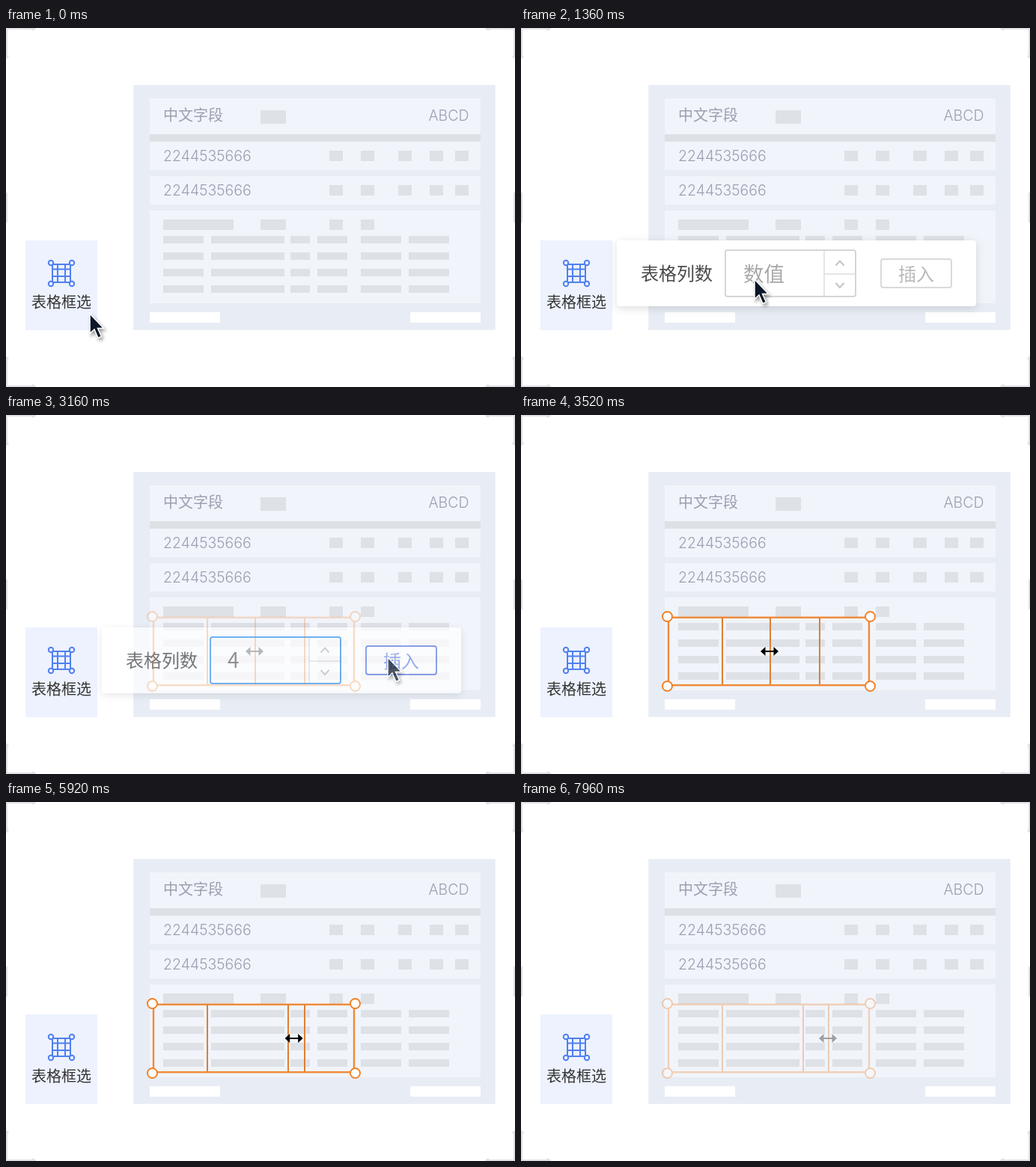
Recreate the animation shown at these times as an HTML page. Size 680 px wide and 480 px high, loop 8 s.

```html
<!DOCTYPE html>
<html lang="zh">
<head>
<meta charset="utf-8">
<title>表格框选</title>
<style>
  html, body { margin: 0; width: 100%; height: 100%; overflow: hidden; background: #fff; }
  svg { display: block; width: 680px; height: 480px; }
  text { font-family: "Noto Sans CJK SC", "Noto Sans CJK", sans-serif; }
  .thin { font-weight: 300; font-size: 20px; fill: #9a9fb0; }
  .latin { font-family: Inter, "Liberation Sans", sans-serif; font-size: 19.5px; }
  .line { fill: none; stroke-width: 2; }
  .popup { fill: #fff; filter: drop-shadow(0 3px 6px rgba(0, 0, 0, .13)); }
  .pointer { fill: #0d1729; stroke: #fff; stroke-width: 1.5; filter: drop-shadow(2px 3px 2px rgba(0, 0, 0, .4)); }
</style>
</head>
<body>
<svg viewBox="0 0 680 480">
  <defs>
    <path id="corner" d="M0 0H40V1L36 4L34 2H2V36L4 38L1 41H0Z" fill="#e1e2e7"/>
  </defs>
  <use href="#corner"/>
  <use href="#corner" transform="translate(680) scale(-1 1)"/>
  <use href="#corner" transform="translate(0 480) scale(1 -1)"/>
  <use href="#corner" transform="translate(680 480) scale(-1)"/>
  <path d="M0 220h2v40h-2zM678 220h2v40h-2z" fill="#e1e2e7"/>

  <rect x="170" y="76" width="484" height="328" fill="#e8ecf4"/>
  <rect x="170.5" y="76.5" width="483" height="327" fill="none" stroke="#edf1f7"/>
  <path d="M192 94h442v48h-442zM192 152h442v38h-442zM192 198h442v38h-442zM192 244h442v124h-442z" fill="#f1f4fa"/>
  <path d="M192 380h94v14h-94zM540 380h94v14h-94z" fill="#fff"/>
  <path d="M192 142h442v10h-442z" fill="#dde0e5"/>
  <g id="blocks" fill="#dee1e6"></g>
  <text class="thin" x="210" y="123.5">中文字段</text>
  <text class="thin latin" x="618.5" y="123.5" text-anchor="end">ABCD</text>
  <text class="thin latin" x="210" y="177.5">2244535666</text>
  <text class="thin latin" x="210" y="223.5">2244535666</text>

  <rect x="26" y="284" width="96" height="120" fill="#edf2fe"/>
  <g class="line" stroke="#4f80f0">
    <path d="M62 317V339M86 317V339M63 316H85M63 340H85M69 316V340M79 316V340M62 322.500H86M62 332H86"/>
    <g id="knobs" fill="#edf2fe"></g>
  </g>
  <text x="34" y="373.5" font-size="20" fill="#333">表格框选</text>

  <g id="popup">
    <rect class="popup" x="128" y="284" width="480" height="88" rx="4"/>
    <text x="160" y="336.500" font-size="24" fill="#4a4a4a">表格列数</text>
    <path class="line" d="M405 297V359M405 329H447" stroke="#dedede" style="stroke-width:1.5"/>
    <path class="line" d="M420.500 317.500L426 311.500L431.500 317.500M420.500 341L426 347L431.500 341" stroke="#c4c4c4"/>
    <g id="empty">
      <rect class="line" x="273" y="297" width="174" height="62" rx="3" stroke="#d6d6d6"/>
      <rect class="line" x="481" y="309" width="94" height="38" rx="3" stroke="#dadada"/>
      <text x="297" y="339" font-size="27.500" fill="#a9a9a9">数值</text>
      <text x="504" y="338" font-size="24" fill="#b8b8b8">插入</text>
    </g>
    <g id="filled">
      <rect class="line" x="273" y="297" width="174" height="62" rx="3" stroke="#3f97f2"/>
      <rect class="line" x="481" y="309" width="94" height="38" rx="3" stroke="#6585e6"/>
      <text x="296" y="338" font-size="28" fill="#737373">4</text>
      <text x="504" y="338" font-size="24" fill="#7b95ee">插入</text>
    </g>
  </g>

  <g id="table">
    <rect class="line" x="197" y="270.750" width="268" height="90.500" stroke="#f08a38" style="stroke-width:2.400"/>
    <g class="line" stroke="#dd7f35">
      <path d="M269 271V360"/>
      <path id="colA" d="M0 271V360"/>
      <path id="colB" d="M0 271V360"/>
    </g>
    <g id="handles" fill="#fff" stroke="#f08227" stroke-width="2"></g>
    <path id="resize" d="M-12 0L-5.500 -6V-1H5.500V-6L12 0L5.500 6V1H-5.500V6Z"/>
  </g>
  <path id="pointer" class="pointer" d="M0 0V26.500L6 21L11 32.500L15.500 30.500L10.500 19.500H18.500Z"/>
</svg>
<script>
const $ = id => document.getElementById(id);
const LOOP = 8000, STEP = 40;

function add(parent, tag, attrs) {
  const el = document.createElementNS("http://www.w3.org/2000/svg", tag);
  for (const key in attrs) el.setAttribute(key, attrs[key]);
  $(parent).append(el);
}
const block = (x, y, width, height) => add("blocks", "rect", { x, y, width, height });
function corners(parent, xs, ys, r) {
  for (const cx of xs) for (const cy of ys) add(parent, "circle", { cx, cy, r });
}

block(340, 110, 34, 18);
for (const y of [164, 210]) for (const x of [432, 474, 524, 566, 600]) block(x, y, 18, 14);
for (const [x, w] of [[210, 94], [340, 34], [432, 18], [474, 18]]) block(x, 256, w, 14);
for (let y = 278; y < 350; y += 22)
  for (const [x, w] of [[210, 54], [274, 98], [380, 26], [416, 40], [474, 54], [538, 54]]) block(x, y, w, 10);
corners("knobs", [60, 88], [314, 342], 3.2);
corners("handles", [195.5, 466.5], [269.5, 362.5], 6.5);

// start time and step count of each transition
const moves = {
  open: [1000, 10], fill: [2040, 9], insert: [3160, 10],
  dragA: [4960, 10], hop: [5920, 9], dragB: [6840, 9], close: [7880, 10]
};

function progress(t, [start, steps]) {
  const p = Math.min(1, Math.max(0, (t - start + STEP) / (steps * STEP)));
  return 1 - (1 - p) ** 3;
}
const fade = (id, value) => $(id).setAttribute("opacity", value);
const place = (id, x, y = 0) => $(id).setAttribute("transform", `translate(${x} ${y})`);

function draw(t) {
  const p = {};
  for (const name in moves) p[name] = progress(t, moves[name]);
  fade("popup", p.open * (1 - p.insert));
  fade("empty", 1 - p.fill);
  fade("filled", p.fill);
  fade("pointer", 1 - p.insert);
  fade("table", p.insert * (1 - p.close));
  place("pointer", 112 + 200 * p.open + 198 * p.fill, 382 - 46 * p.open - 12 * p.fill);
  place("colA", 333 + 44 * p.dragA);
  place("colB", 399 + 12 * p.dragB);
  place("resize", 332 + 47 * p.dragA + 19 * p.hop + 12 * p.dragB, 316);
}

const origin = performance.now();
function tick() {
  const t = (performance.now() - origin) % LOOP;
  draw(Math.floor(t / STEP) * STEP);
  requestAnimationFrame(tick);
}
tick();
</script>
</body>
</html>
```
